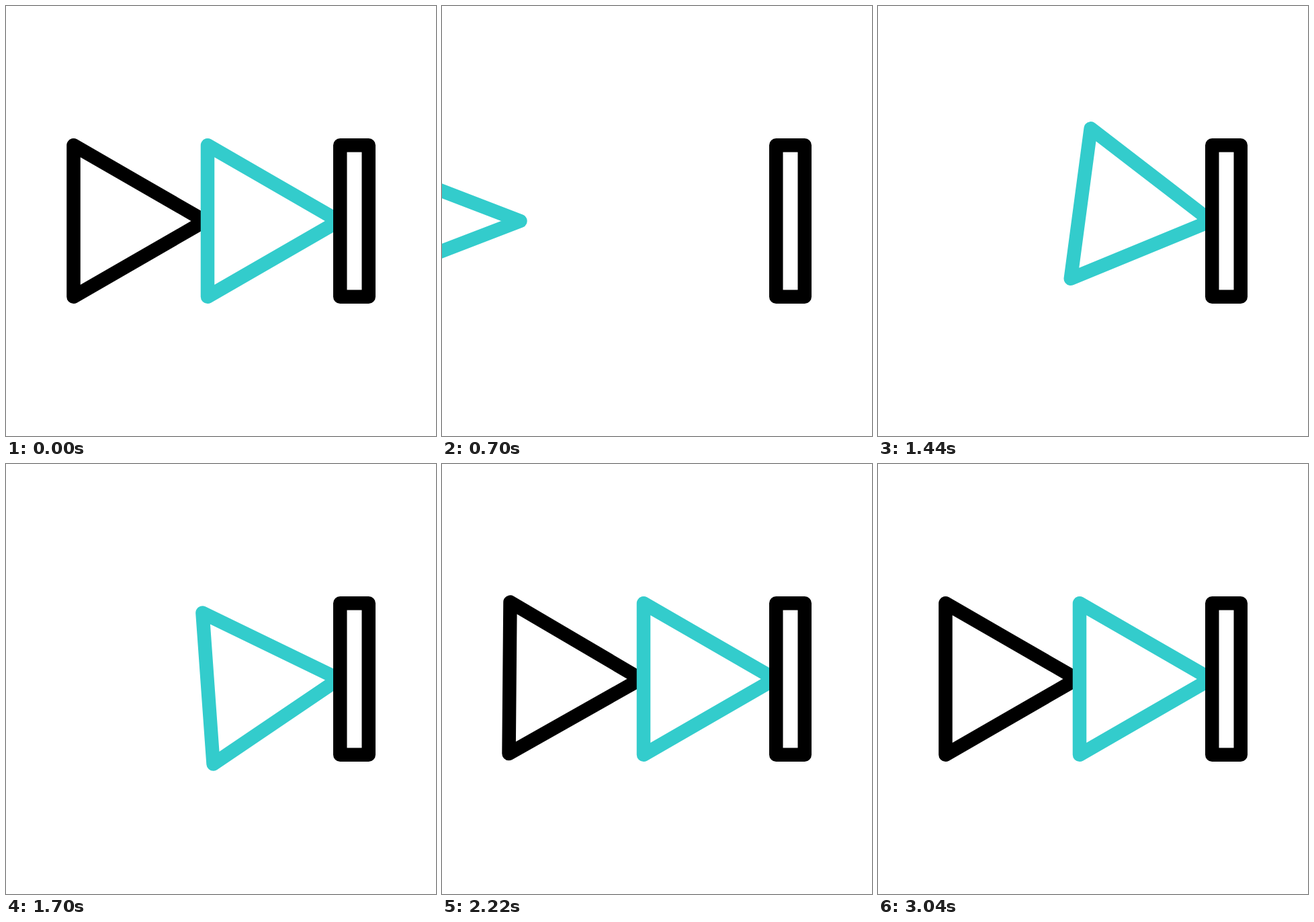
An HTML page for the animation above (3.6 s loop, 640 by 640 pixels).

```html
<!DOCTYPE html>
<html lang="en">
<head>
<meta charset="utf-8">
<title>Skip forward</title>
<style>
  html, body { margin: 0; height: 100%; overflow: hidden; background: #fff; }
  svg { display: block; width: 100%; height: 100%; }
</style>
</head>
<body>
<svg viewBox="0 0 640 640" fill="none" stroke="#000" stroke-width="20.5" stroke-linejoin="round">
  <path id="back"/>
  <path id="front" stroke="#33cccc"/>
  <rect x="497.25" y="207.25" width="42.5" height="225.5"/>
</svg>
<script>
const STEP = 20, LOOP = 3600;
const WIDTH = 195.5, HALF = 112.75, MID = 320;
const FADE_END = 21;

// Swing around the tip after the impact: [step, degrees]
const SWING = [[44, 0], [54, 16], [64, -15], [74, 10], [84, -4.5], [91, 3.7], [97, -1.6], [100, 0]];

const triangles = [
  { el: document.getElementById('back'), tip: 296, delay: 52 },
  { el: document.getElementById('front'), tip: 495.5, delay: 0 }
];

// Sine ease from 0 to 1 between steps a and b
function ease(a, b, n) {
  const u = Math.min(1, Math.max(0, (n - a) / (b - a)));
  return (1 - Math.cos(Math.PI * u)) / 2;
}

function swingAt(n) {
  let angle = 0;
  for (let i = 1; i < SWING.length; i++) {
    const [a, from] = SWING[i - 1], [b, to] = SWING[i];
    if (n >= a && n < b) angle = from + (to - from) * ease(a, b, n);
  }
  return angle;
}

function pose({ el, tip, delay }, step) {
  const leaving = step < FADE_END;
  const n = leaving ? Infinity : step - delay;
  const x = tip - 545 * (1 - ease(27, 48.5, n));
  const half = HALF * (0.5 + 0.5 * ease(27, 47.5, n));
  el.setAttribute('d', `M${x} ${MID}L${x - WIDTH} ${MID - half}V${MID + half}Z`);
  el.setAttribute('transform', `rotate(${swingAt(n)} ${x} ${MID})`);
  el.setAttribute('opacity', leaving ? 1 - step / FADE_END : 1);
}

const start = performance.now();
function draw() {
  const step = Math.floor((performance.now() - start) % LOOP / STEP);
  triangles.forEach(t => pose(t, step));
  requestAnimationFrame(draw);
}
draw();
</script>
</body>
</html>
```
